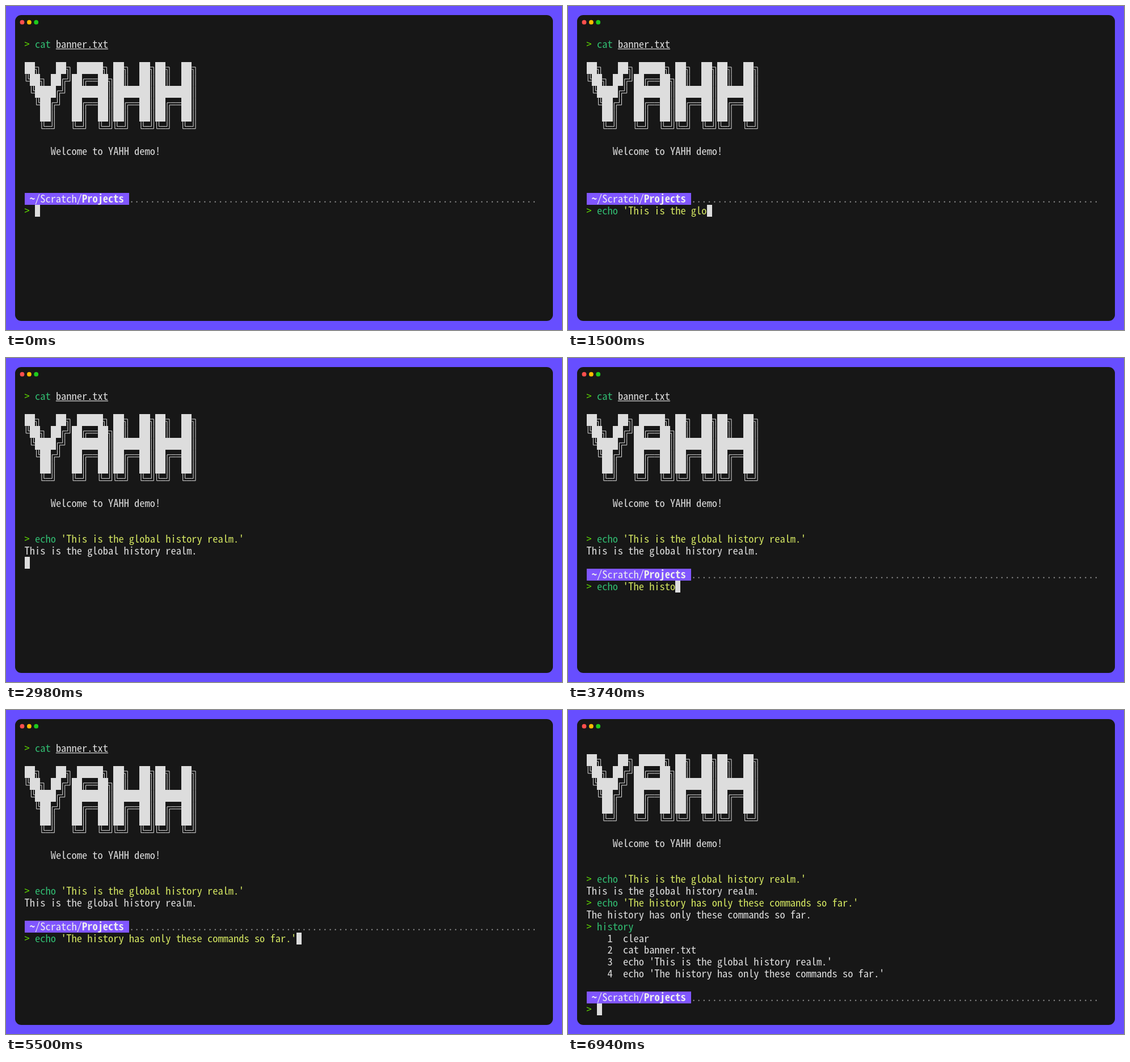
An HTML page that plays this animation: 980 by 572 pixels, repeating every 8 s.

```html
<!DOCTYPE html>
<html lang="en">
<head>
<meta charset="utf-8">
<title>Terminal history demo</title>
<style>
  html, body { margin: 0; width: 100%; height: 100%; overflow: hidden; background: #674eff; }
  svg { display: block; width: 100vw; height: 100vh; }
  text {
    font-family: "Noto Sans Mono CJK JP", "Noto Sans Mono CJK SC", "Noto Sans Mono", "DejaVu Sans Mono", monospace;
    font-variant-ligatures: none; font-kerning: none; white-space: pre;
  }
</style>
</head>
<body>
<svg viewBox="0 0 980 572" xmlns="http://www.w3.org/2000/svg">
  <rect width="980" height="572" fill="#674eff"/>
  <rect x="16" y="16" width="948" height="540" rx="11" fill="#171717"/>
  <circle cx="28.5" cy="28.7" r="3.9" fill="#ff4f4d"/>
  <circle cx="40.9" cy="28.7" r="3.9" fill="#febb00"/>
  <circle cx="53.2" cy="28.7" r="3.9" fill="#1ecb1d"/>
  <g id="banner"></g>
  <g id="screen"></g>
</svg>
<script>
const LOOP = 8000, FRAME = 40, PHASE = 20;
const X0 = 32.6, Y0 = 57.5, CELL = 9.215, ROW = 20.95, BASE = 16.8;
const KEY = 50.1; // ms per typed character
const FG = '#dddddd', GREEN = '#31bb71', LIME = '#5fd700', YELLOW = '#d3e561',
      BAD = '#fe5f86', PATH_BG = '#8056ff', PATH_FG = '#eeeeee', DOT = '#8a8a8a';

const ART = [
  '██╗   ██╗ █████╗ ██╗  ██╗██╗  ██╗',
  '╚██╗ ██╔╝██╔══██╗██║  ██║██║  ██║',
  ' ╚████╔╝ ███████║███████║███████║',
  '  ╚██╔╝  ██╔══██║██╔══██║██╔══██║',
  '   ██║   ██║  ██║██║  ██║██║  ██║',
  '   ╚═╝   ╚═╝  ╚═╝╚═╝  ╚═╝╚═╝  ╚═╝',
];
const SAY = ['This is the global history realm.', 'The history has only these commands so far.'];
const CMDS = [`echo '${SAY[0]}'`, `echo '${SAY[1]}'`, 'history'];
const PAST = ['clear', 'cat banner.txt', CMDS[0], CMDS[1]];

// prompt shown, first key time, first visible key, Enter
const STAGES = [
  { prompt: 0, type: 487.5, show: 500, enter: 2980 },
  { prompt: 3020, type: 3017.7, show: 3060, enter: 6020 },
  { prompt: 6060, type: 6048.9, show: 6100, enter: 6900 },
  { prompt: 6940, type: Infinity, show: Infinity, enter: Infinity },
];

const colX = c => X0 + c * CELL;
const rowY = r => Y0 + r * ROW;
const esc = s => s.replace(/&/g, '&amp;').replace(/</g, '&lt;').replace(/>/g, '&gt;');

function fontSize() {
  const ctx = document.createElement('canvas').getContext('2d');
  ctx.font = '100px ' + getComputedStyle(document.querySelector('#probe')).fontFamily;
  return 100 * CELL / ctx.measureText('0').width;
}

function text(col, row, str, fill = FG, bold = false) {
  return `<text x="${colX(col).toFixed(2)}" y="${(rowY(row) + BASE).toFixed(2)}" fill="${fill}"` +
    `${bold ? ' font-weight="700"' : ''}>${esc(str)}</text>`;
}

function box(col, row, cols, fill) {
  return `<rect x="${colX(col)}" y="${rowY(row)}" width="${cols * CELL}" height="${ROW}" ` +
    `fill="${fill}" shape-rendering="crispEdges"/>`;
}

// Double-line box characters: two parallel strokes through the cell centre.
function boxLine(ch, x, y) {
  const d = 2, cx = x + CELL / 2, cy = y + ROW / 2, right = x + CELL, low = y + ROW;
  if (ch === '═') return [-d, d].map(o => `M${x} ${cy + o}H${right}`).join('');
  if (ch === '║') return [-d, d].map(o => `M${cx + o} ${y}V${low}`).join('');
  const sx = '╔╚'.includes(ch) ? 1 : -1, sy = '╔╗'.includes(ch) ? 1 : -1;
  return [-d, d].map(o =>
    `M${sx > 0 ? right : x} ${cy + sy * o}H${cx + sx * o}V${sy > 0 ? low : y}`).join('');
}

function bannerArt() {
  let blocks = '', lines = '';
  ART.forEach((str, i) => {
    const row = i + 2;
    for (const m of str.matchAll(/█+/g)) blocks += box(m.index, row, m[0].length, FG);
    for (const m of str.matchAll(/[^█ ]/g)) lines += boxLine(m[0], colX(m.index), rowY(row));
  });
  return `${blocks}<path d="${lines}" fill="none" stroke="${FG}" stroke-width="1"/>` +
    text(5, 9, 'Welcome to YAHH demo!');
}

function command(row, str) {
  const [word] = str.split(' ');
  const known = word === 'echo' || word === 'history';
  return text(0, row, '>', LIME) +
    (word ? text(2, row, word, known ? GREEN : BAD, !known) : '') +
    (str.length > word.length ? text(3 + word.length, row, str.slice(word.length + 1), YELLOW) : '');
}

function promptBar(row) {
  return box(0, row, 20, PATH_BG) +
    text(1, row, '~', PATH_FG, true) + text(2, row, '/Scratch/', PATH_FG) +
    text(11, row, 'Projects', PATH_FG, true) + text(20, row, '.'.repeat(78), DOT);
}

function output(i, row) {
  return i < 2 ? text(0, row, SAY[i])
    : PAST.map((s, n) => text(4, row + n, `${n + 1}  ${s}`)).join('');
}

function typed(i, t) {
  const s = STAGES[i];
  if (t < s.show) return '';
  return CMDS[i].slice(0, Math.floor((t - s.type) / KEY) + 1);
}

function screenAt(t) {
  const scroll = t >= STAGES[3].prompt ? 1 : 0;
  let out = '', row = 12 - scroll;
  if (!scroll) {
    out += text(0, 0, '>', LIME) + text(2, 0, 'cat', GREEN) + text(6, 0, 'banner.txt') +
      `<rect x="${colX(6)}" y="75.2" width="${10 * CELL}" height="1.2" fill="${FG}"/>`;
  }
  for (let i = 0; i < STAGES.length; i++) {
    const s = STAGES[i];
    if (t < s.prompt) { out += box(0, row, 1, FG); break; }
    if (t < s.enter) {
      const str = typed(i, t);
      out += promptBar(row + 1) + command(row + 2, str) + box(2 + str.length, row + 2, 1, FG);
      break;
    }
    out += command(row, CMDS[i]) + output(i, row + 1);
    row += i < 2 ? 2 : 1 + PAST.length;
  }
  return { out, scroll };
}

const banner = document.getElementById('banner');
const screen_ = document.getElementById('screen');
screen_.innerHTML = '<text id="probe"></text>';
document.querySelector('svg').setAttribute('font-size', fontSize());
banner.innerHTML = bannerArt();

let last = null;
function draw() {
  const now = performance.now() % LOOP;
  const t = Math.max(0, Math.floor((now - PHASE) / FRAME) * FRAME + PHASE);
  if (t !== last) {
    last = t;
    const { out, scroll } = screenAt(t);
    banner.setAttribute('transform', `translate(0 ${-scroll * ROW})`);
    screen_.innerHTML = out;
  }
  requestAnimationFrame(draw);
}
draw();
</script>
</body>
</html>
```
